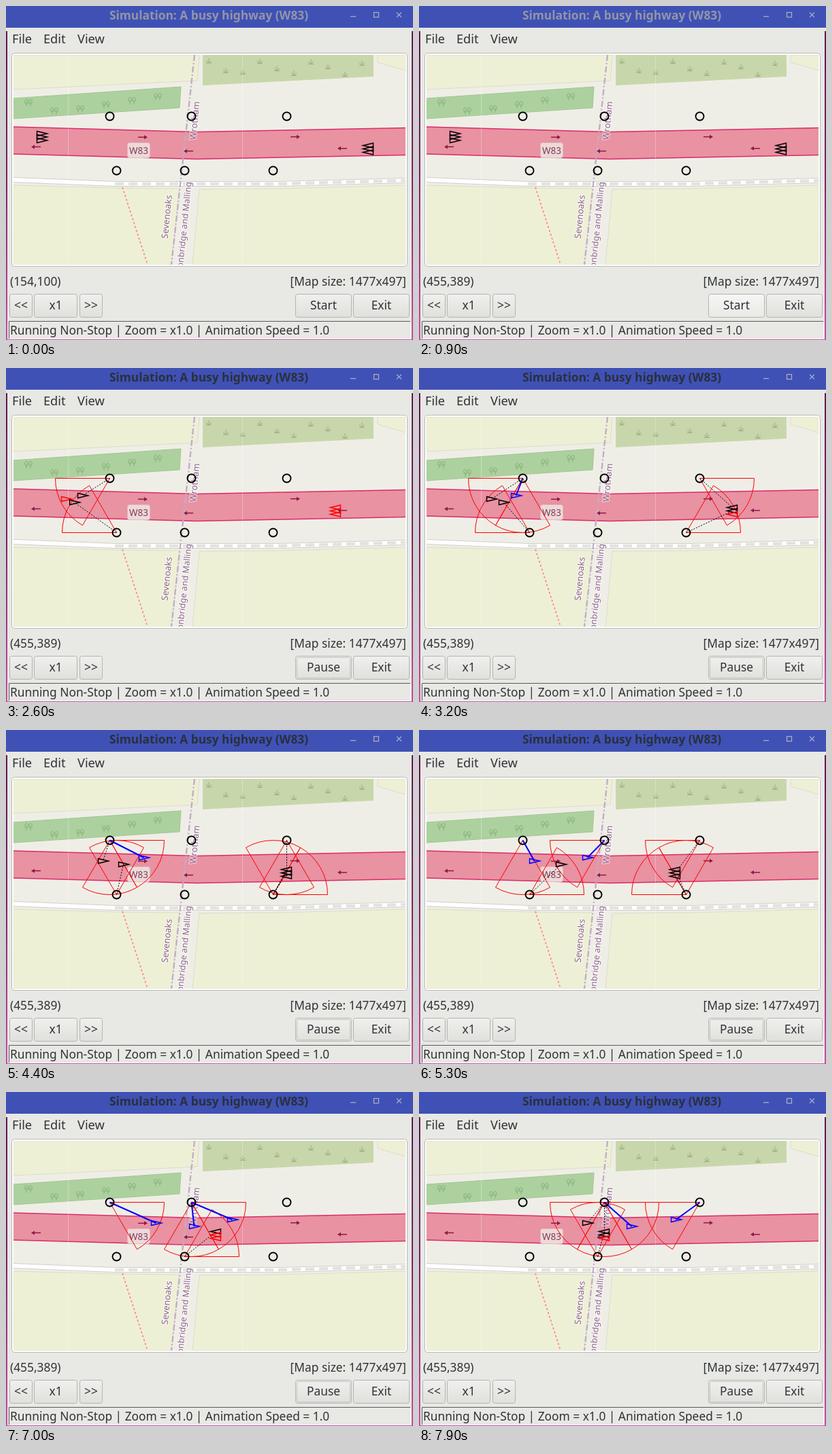
An HTML page with a canvas that plays this animation: 598x492 px, repeating every 8000 ms.

```html
<!DOCTYPE html>
<html lang="en">
<head>
<meta charset="utf-8">
<title>Highway simulation</title>
<style>
  html, body { margin: 0; width: 100%; height: 100%; overflow: hidden; }
  canvas { display: block; }
</style>
</head>
<body>
<canvas id="stage" width="598" height="492"></canvas>
<script>
const ctx = document.getElementById('stage').getContext('2d');
const FONT = '"Noto Sans", sans-serif';
const INK = '#2e3436';
const LOOP = 8000, TICK = 100;
const MAP = { x: 11, y: 72, w: 576, h: 309, right: 587, bottom: 381 };

// ---------- helpers ----------
function path(points, close) {
  ctx.beginPath();
  points.forEach(([x, y]) => ctx.lineTo(x, y));
  if (close) ctx.closePath();
}
function stroke(color, width = 1, dash = []) {
  ctx.setLineDash(dash);
  ctx.strokeStyle = color;
  ctx.lineWidth = width;
  ctx.stroke();
  ctx.setLineDash([]);
}
function line(color, width, points, dash) {
  path(points);
  stroke(color, width, dash);
}
function area(color, points, edge) {
  path(points, true);
  ctx.fillStyle = color;
  ctx.fill();
  if (edge) stroke(edge);
}
function rect(x, y, w, h, fill) {
  ctx.fillStyle = fill;
  ctx.fillRect(x, y, w, h);
}
function box(x, y, w, h, r, fill, edge) {
  ctx.beginPath();
  ctx.roundRect(x, y, w, h, r);
  if (fill) { ctx.fillStyle = fill; ctx.fill(); }
  stroke(edge);
}
function text(str, x, y, { size = 17.33, color = INK, align = 'left', weight = 400 } = {}) {
  ctx.font = `${weight} ${size}px ${FONT}`;
  ctx.textAlign = align;
  ctx.fillStyle = color;
  ctx.fillText(str, x, y);
}
function gradient(y0, y1, ...colors) {
  const g = ctx.createLinearGradient(0, y0, 0, y1);
  colors.forEach((c, i) => g.addColorStop(i / (colors.length - 1), c));
  return g;
}
function times(n, make) {
  return Array.from({ length: n }, (_, i) => make(i));
}

// ---------- simulation ----------
const RANGE = 80, SECTOR = Math.PI / 3;
const SENSORS = [
  ...[152, 272, 412].map(x => ({ x, y: 162, side: 1 })),
  ...[162, 262, 392].map(x => ({ x, y: 242, side: -1 }))
];
const EAST_SPEEDS = [5, 3, 4], WEST_SPEED = -4;
const CARS = times(6, i => i < 3
  ? { x: 52, y: 187.5 + 5 * i, v: EAST_SPEEDS[i] }
  : { x: 532, y: 190 + 5 * i, v: WEST_SPEED });

// Every sensor has three sectors, numbered from right to left.
function sectorsSeeing(x, y) {
  return SENSORS.flatMap((s, i) => {
    const dx = x - s.x, dy = Math.abs(y - s.y);
    return Math.hypot(dx, dy) > RANGE ? [] : [i * 3 + Math.floor(Math.atan2(dy, dx) / SECTOR)];
  });
}

// A sector follows one car and keeps it until the car leaves.
function simulate(steps) {
  const owner = new Map();
  const held = CARS.map(() => undefined);
  return times(steps + 1, n => {
    const seen = CARS.map(c => sectorsSeeing(c.x + c.v * n, c.y));
    seen.forEach((keys, i) => {
      if (keys.includes(held[i])) return;
      owner.delete(held[i]);
      held[i] = keys.find(k => !owner.has(k));
      if (held[i] !== undefined) owner.set(held[i], i);
    });
    return CARS.map((c, i) => ({
      x: c.x + c.v * n, y: c.y, dir: Math.sign(c.v), key: held[i],
      shared: seen[i].filter(k => owner.has(k)).length > 1
    }));
  });
}
const FIRST = 14;
const STATES = simulate(LOOP / TICK - 1 - FIRST);

// The display skips a beat every two seconds and then catches up.
function stepAt(tick) {
  const stalled = tick > 50 && tick % 20 === 12;
  return Math.max(0, tick - FIRST - (stalled ? 1 : 0));
}

// ---------- map ----------
const FIELD = '#eef0d5', VERGE = '#dcdccb';
const ROAD = [[11, 178], [280, 185.5], [587, 179.5]];
const shift = (points, dy) => points.map(([x, y]) => [x, y + dy]);

function roadTop(x) {
  const [a, b] = x < ROAD[1][0] ? ROAD : ROAD.slice(1);
  return a[1] + (b[1] - a[1]) * (x - a[0]) / (b[0] - a[0]);
}
function tree(x, y) {
  for (const side of [-3, 3]) {
    ctx.beginPath();
    ctx.ellipse(x + side, y - 2, 2.4, 3.4, 0, 0, 7);
    ctx.moveTo(x + side, y - 2);
    ctx.lineTo(x + side, y + 5);
    stroke('#86b37c');
  }
}
function tuft(x, y) {
  ctx.beginPath();
  for (const dx of [-4, 0, 4]) {
    ctx.moveTo(x, y + 3);
    ctx.lineTo(x + dx, y - 4 + Math.abs(dx) * .8);
  }
  ctx.moveTo(x - 4, y + 3);
  ctx.lineTo(x + 4, y + 3);
  stroke('#98ac7c');
}
function roadArrow(x, dir) {
  const y = roadTop(x) + (dir > 0 ? 10 : 28.5);
  const c = '#8a1a4a';
  line(c, 1.5, [[x - 7 * dir, y], [x + 4 * dir, y]]);
  area(c, [[x + 7 * dir, y], [x + 2 * dir, y - 3], [x + 2 * dir, y + 3]]);
}
function mapLabel(str, x, y, align = 'center', size = 13) {
  ctx.save();
  ctx.translate(x, y);
  ctx.rotate(-1.47);
  ctx.textBaseline = 'middle';
  ctx.font = `400 ${size}px ${FONT}`;
  ctx.textAlign = align;
  ctx.lineJoin = 'round';
  ctx.strokeStyle = 'rgba(255,255,255,.55)';
  ctx.lineWidth = 2.5;
  ctx.strokeText(str, 0, 0);
  text(str, 0, 0, { size, color: '#8d618b', align });
  ctx.restore();
}

function drawMap() {
  const { x, y, w, h, right, bottom } = MAP;
  rect(x, y, w, h, '#efeee6');
  area(FIELD, [[x, y], [284, y], [281, 110], [x, 123]], VERGE);
  area(FIELD, [[546, y], [right, y], [right, 95], [546, 83]], VERGE);
  area(FIELD, [[x, 264], [160, 268], [255, 269], [243, bottom], [x, bottom]], VERGE);
  area(FIELD, [[284, 270], [400, 269], [right, 264], [right, bottom], [274, bottom]], VERGE);
  area('#c8d7ab', [[289, y], [540, y], [540, 104], [289, 117]]);
  area('#add19e', [[x, 136], [257, 119], [255, 150], [x, 166]], '#a2c594');
  times(6, i => tree(33 + 38 * i, Math.min(143 + 12 * i, 164 - 6 * i)));
  times(10, i => tuft(298 + 25 * i, 91 - 10 * Math.cos(2 * i)));

  const lane = [[x, 256], [160, 262], [400, 262], [right, 257]];
  line('#cfcfca', 8, lane);
  line('#ffffff', 6, lane);
  line('#e2e2de', 4.5, lane.slice(1), [13, 7]);

  area('#e892a2', [...ROAD, ...shift(ROAD, 40).reverse()]);
  line('#dc2a67', 1.4, ROAD);
  line('#dc2a67', 1.4, shift(ROAD, 40));
  for (const gx of [91.5, 347.5]) line('rgba(255,255,255,.3)', 1, [[gx, y], [gx, bottom]]);

  line('#c2adc8', 2.4, [[277, y], [243, bottom]], [9, 3, 2, 3]);
  line('#f9918d', 1.9, [[171, 267], [208, bottom]], [3, 3]);

  for (const ax of [201, 425]) roadArrow(ax, 1);
  for (const ax of [44, 268, 494]) roadArrow(ax, -1);

  box(178.5, 201.5, 33, 22, 3, '#eed9d8', '#dcbcc0');
  text('W83', 195, 217.5, { size: 13.5, color: '#7d3f5c', align: 'center' });
  mapLabel('Wrotham', 278, 169);
  mapLabel('Sevenoaks', 237, 310.5);
  mapLabel('Tonbridge and Malling', 269, 259, 'right', 12.6);
}

// ---------- traffic ----------
const RED = '#ff0000', BLUE = '#0000ff', BLACK = '#000000';
const sensorOf = key => SENSORS[Math.floor(key / 3)];

function drawSector(key) {
  const { x, y, side } = sensorOf(key);
  const a = side * (key % 3) * SECTOR;
  ctx.beginPath();
  ctx.moveTo(x, y);
  ctx.arc(x, y, RANGE, a, a + side * SECTOR, side < 0);
  ctx.closePath();
  stroke(RED);
}
function drawBeam({ x, y, key, shared }) {
  const s = sensorOf(key);
  const ends = [[s.x, s.y], [x, y]];
  if (shared) line(BLACK, 1, ends, [2, 2]);
  else line(BLUE, 2, ends);
}
function drawCar({ x, y, dir, key, shared }, idle) {
  path([[x + 8 * dir, y], [x - 7 * dir, y - 3.5], [x - 7 * dir, y + 3.5]], true);
  stroke(idle ? BLACK : key === undefined ? RED : shared ? BLACK : BLUE, 1.4);
}
function drawTraffic(n) {
  const cars = STATES[n];
  const tracked = cars.filter(c => c.key !== undefined);
  ctx.translate(.5, .5); // puts thin lines on whole pixels
  tracked.forEach(c => drawSector(c.key));
  tracked.forEach(drawBeam);
  cars.forEach(c => drawCar(c, n === 0));
  SENSORS.forEach(({ x, y }) => {
    ctx.beginPath();
    ctx.arc(x, y, 6, 0, 7);
    stroke(BLACK, 1.9);
  });
}

// ---------- window ----------
function button(x, w, label, lit, focus) {
  const fill = lit ? gradient(424, 459, '#f6f6f4', '#e9e9e6') : gradient(424, 459, '#f0f0ee', '#dfdfdb');
  box(x + .5, 424.5, w - 1, 34, 3, fill, '#b4b4b0');
  if (focus) box(x + 2.5, 426.5, w - 5, 30, 2, null, '#c2c2be');
  text(label, x + w / 2, 447, { align: 'center' });
}
function titleBar(active) {
  rect(0, 0, 598, 32, '#3f51b5');
  text('Simulation: A busy highway (W83)', 298, 19.5,
    { weight: 700, align: 'center', color: active ? '#2a303c' : '#9296a6' });
  const c = '#a6abc4';
  line(c, 1.3, [[506, 15.5], [514, 15.5]]);
  ctx.strokeRect(540.5, 9.5, 7, 7);
  line(c, 1.3, [[574, 9.5], [581, 16.5]]);
  line(c, 1.3, [[581, 9.5], [574, 16.5]]);
}
// The pointer slows down on its way from the map to the buttons.
function pointerAt(tick) {
  const left = 1 - Math.min(Math.max(tick - 1, 0) / 4, 1);
  const ease = 1 - left * left;
  return [154 + 301 * ease, 100 + 289 * ease].map(Math.round);
}

function drawWindow(tick) {
  const active = tick >= 12;
  rect(0, 0, 598, 492, gradient(0, 492, '#5c1a50', '#7a2468', '#c452a4'));
  rect(0, 32, 598, 5, '#e8e8e4');
  rect(2, 32, 594, 459, '#e8e8e4');
  titleBar(active);

  text('File', 9, 54.5, { size: 18.2 });
  text('Edit', 55, 54.5, { size: 18.2 });
  text('View', 105, 54.5, { size: 18.2 });
  box(8.5, 69.5, 581, 314, 4, '#ffffff', '#b9b9b5');

  text(`(${pointerAt(tick)})`, 6, 411.5);
  text('[Map size: 1477x497]', 588, 411.5, { align: 'right' });

  button(5, 34, '<<');
  button(41, 64, 'x1');
  button(108, 34, '>>');
  button(425, 83, tick < 15 ? 'Start' : 'Pause', tick >= 9 && tick < 15, active);
  button(510, 83, 'Exit', tick >= 5 && tick < 9);

  line('#5a5a58', 1, [[4.5, 490], [4.5, 464.5], [594, 464.5]]);
  line('#fafaf8', 1, [[5, 490.5], [594.5, 490.5], [594.5, 465]]);
  text('Running Non-Stop | Zoom = x1.0 | Animation Speed = 1.0', 6, 484);
}

function render(ms) {
  const tick = Math.floor(ms % LOOP / TICK);
  drawWindow(tick);
  ctx.save();
  ctx.beginPath();
  ctx.rect(MAP.x, MAP.y, MAP.w, MAP.h);
  ctx.clip();
  drawMap();
  drawTraffic(stepAt(tick));
  ctx.restore();
}

let start;
function frame(now) {
  start ??= now;
  render(now - start);
  requestAnimationFrame(frame);
}
requestAnimationFrame(frame);
</script>
</body>
</html>
```
